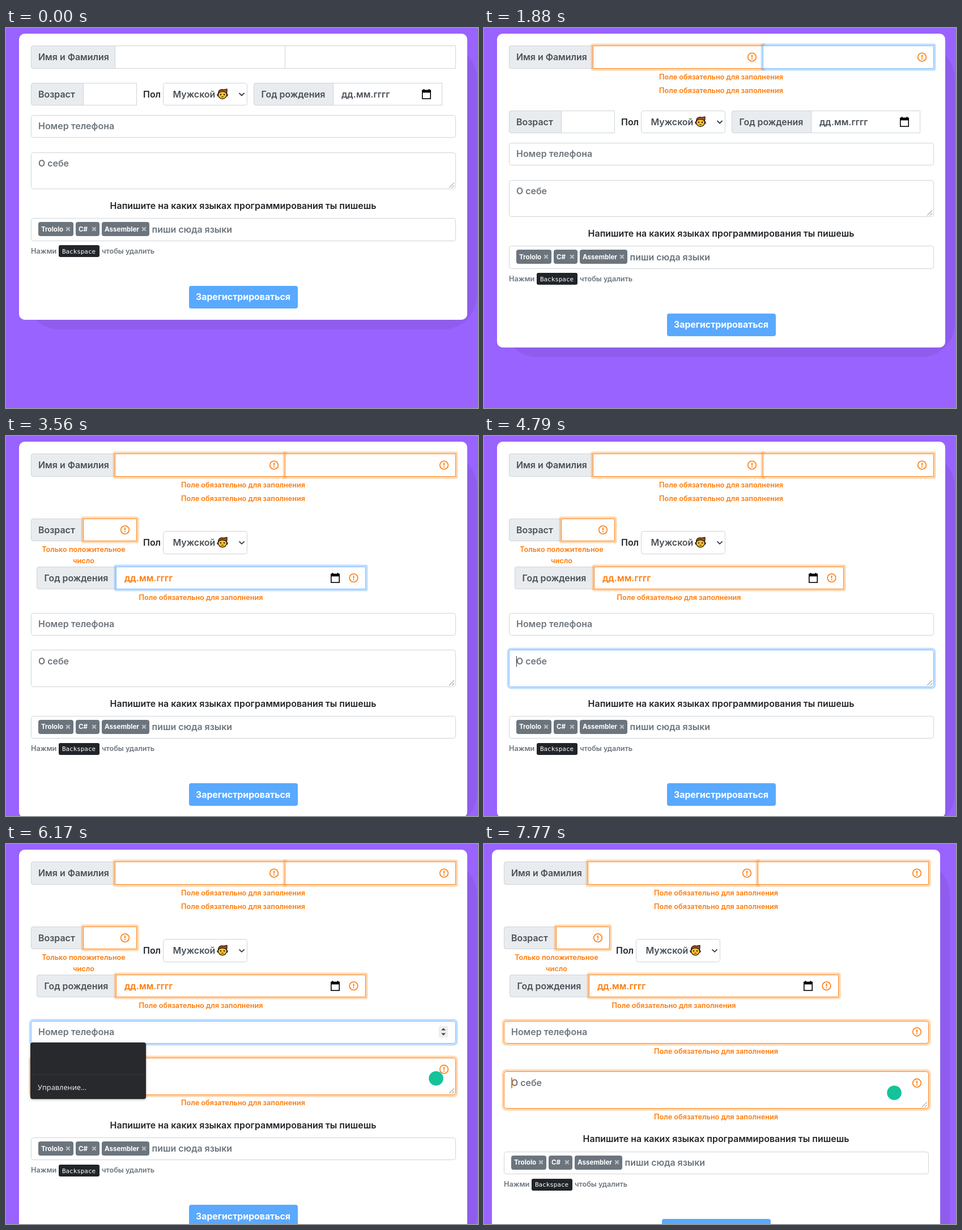
Animation of 833 by 672 pixels, one loop 8000 ms. Source, as an HTML page with a canvas:

```html
<!DOCTYPE html>
<html lang="ru">
<head>
<meta charset="utf-8">
<title>Форма регистрации</title>
<style>
  html, body { margin: 0; width: 100%; height: 100%; overflow: hidden; background: #9963ff; }
  canvas { display: block; width: 833px; height: 672px; }
</style>
</head>
<body>
<canvas id="stage" width="833" height="672"></canvas>
<script>
const ctx = document.getElementById('stage').getContext('2d');
const LOOP = 8000;
const SANS = 'Inter, "Open Sans", sans-serif';
const MONO = '"DejaVu Sans Mono", monospace';
const ORANGE = '#ff7a08', GRAY = '#6c757d', LABEL = '#495057', INK = '#212529';
const REQUIRED = 'Поле обязательно для заполнения';
const ROW = 40.25, ERROR_ROW = 24.3;

// Moments when the form changes
const T = {
  first: 730, second: 1240, hideSecond: 1760, age: 1880, hideAge: 2300,
  ageCaret: 2670, ageBad: 2700, date: 3250, dateBad: 3560, about: 3570,
  phone: 5290, badge: 5500, hidePhone: 6300, phoneBad: 6530
};

// Border and glow of a field, as rgba
const IDLE = { border: [206, 212, 218, 1], glow: [255, 255, 255, 0] };
const FOCUS = { border: [128, 189, 255, 1], glow: [0, 123, 255, 0.25] };
const BAD = { border: [255, 134, 24, 1], glow: [255, 134, 24, 0.34] };

const clamp = v => Math.max(0, Math.min(1, v));
const ease = v => v * v * (3 - 2 * v);
const mix = (a, b, k) => a.map((v, i) => v + (b[i] - v) * k);
const rgba = c => `rgba(${c.slice(0, 3).map(Math.round).join()},${c[3]})`;
const within = (t, a, b) => t >= a && t < b;

function look(t, ...steps) {
  let now = IDLE;
  for (const [start, next] of steps) {
    if (t < start) break;
    const k = ease(clamp((t - start) / 150));
    now = { border: mix(now.border, next.border, k), glow: mix(now.glow, next.glow, k) };
  }
  return now;
}

// Moves all four edges to whole pixels
function snap(x, y, w, h) {
  const left = Math.round(x), top = Math.round(y);
  return [left, top, Math.round(x + w) - left, Math.round(y + h) - top];
}

function text(str, x, cy, { size = 15.95, color = GRAY, weight = 600, align = 'left', family = SANS } = {}) {
  ctx.font = `${weight} ${size}px ${family}`;
  ctx.fillStyle = color;
  ctx.textAlign = align;
  ctx.fillText(str, x, Math.round(cy + size * 0.36));
}

const error = (str, x, cy) => text(str, x, cy, { size: 12.65, color: ORANGE, align: 'center' });

function box(x, y, w, h, r, fill, border) {
  [x, y, w, h] = snap(x, y, w, h);
  ctx.beginPath();
  ctx.roundRect(x, y, w, h, r);
  ctx.fillStyle = fill;
  ctx.fill();
  if (!border) return;
  ctx.beginPath();
  ctx.roundRect(x + 0.5, y + 0.5, w - 1, h - 1, r);
  ctx.strokeStyle = border;
  ctx.lineWidth = 1;
  ctx.stroke();
}

function line(color, width, ...pts) {
  ctx.beginPath();
  pts.forEach(([x, y]) => ctx.lineTo(x, y));
  ctx.strokeStyle = color;
  ctx.lineWidth = width;
  ctx.stroke();
}

function disc(x, y, r, color) {
  ctx.beginPath();
  ctx.arc(x, y, r, 0, 7);
  ctx.fillStyle = color;
  ctx.fill();
}

function input(x, y, w, h, r, style = IDLE) {
  const g = 3.4;
  [x, y, w, h] = snap(x, y, w, h);
  box(x, y, w, h, r, '#fff', rgba(style.border));
  ctx.beginPath();
  ctx.roundRect(x - g, y - g, w + 2 * g, h + 2 * g, r + g);
  ctx.roundRect(x, y, w, h, r);
  ctx.fillStyle = rgba(style.glow);
  ctx.fill('evenodd');
}

function addon(str, x, y, w, tx) {
  box(x, y, w, ROW, [4, 0, 0, 4], '#e9ecef', '#ced4da');
  text(str, tx, y + 20, { color: LABEL });
}

function warning(x, y) {
  ctx.beginPath();
  ctx.arc(x, y, 7.3, 0, 7);
  ctx.strokeStyle = ORANGE;
  ctx.lineWidth = 1.6;
  ctx.stroke();
  line(ORANGE, 1.8, [x, y - 4.2], [x, y + 1]);
  disc(x, y + 3.3, 1.1, ORANGE);
}

function spinner(x, y) {
  box(x - 8, y - 10, 16, 20, 2, '#ededed');
  ctx.fillStyle = '#444';
  for (const s of [-1, 1]) {
    ctx.beginPath();
    ctx.moveTo(x - 4, y + s * 2.5);
    ctx.lineTo(x + 4, y + s * 2.5);
    ctx.lineTo(x, y + s * 6.5);
    ctx.fill();
  }
}

function calendar(x, y) {
  ctx.strokeStyle = '#000';
  ctx.lineWidth = 1.6;
  ctx.strokeRect(x - 7.2, y - 6.5, 14.4, 14.5);
  ctx.fillStyle = '#000';
  ctx.fillRect(x - 8, y - 7.3, 16, 4.6);
  ctx.fillRect(x - 5.5, y - 9, 2, 2);
  ctx.fillRect(x + 3.5, y - 9, 2, 2);
}

function boy(x, y) {
  ctx.lineWidth = 1.2;
  ctx.strokeStyle = '#1c1207';
  for (const s of [-1, 1]) {
    disc(x + s * 7.4, y + 1.5, 1.8, '#ffc02e');
    ctx.stroke();
  }
  disc(x, y + 0.8, 7.6, '#ffc02e');
  ctx.stroke();
  ctx.beginPath();
  ctx.moveTo(x - 7.4, y - 1);
  ctx.bezierCurveTo(x - 7.5, y - 8, x - 2, y - 9, x + 2, y - 8);
  ctx.lineTo(x + 8, y - 9);
  ctx.quadraticCurveTo(x + 8.5, y - 5, x + 7.4, y - 1);
  ctx.quadraticCurveTo(x + 5, y - 4.5, x, y - 4.5);
  ctx.quadraticCurveTo(x - 5, y - 4.5, x - 7.4, y - 1);
  ctx.fillStyle = '#a4502a';
  ctx.fill();
  ctx.stroke();
  disc(x - 3, y + 0.8, 1.2, '#1c1207');
  disc(x + 3, y + 0.8, 1.2, '#1c1207');
  line('#1c1207', 1, [x - 2, y + 4.8], [x + 2, y + 4.8]);
}

function tag(str, x, y, w) {
  box(x, y, w, 25, 4, GRAY);
  text(str, x + 5, y + 12.3, { size: 11.6, color: '#fff', weight: 700 });
  const cx = x + w - 9.5, cy = y + 12.3, c = '#b9bec3';
  line(c, 2.2, [cx - 3.2, cy - 3.2], [cx + 3.2, cy + 3.2]);
  line(c, 2.2, [cx - 3.2, cy + 3.2], [cx + 3.2, cy - 3.2]);
}

function popup(t, x, y, w, h, start, hide) {
  if (!within(t, start, hide + 120)) return;
  ctx.save();
  ctx.globalAlpha = 1 - clamp((t - hide) / 120);
  ctx.shadowColor = 'rgba(0,0,0,.3)';
  ctx.shadowBlur = 4;
  ctx.shadowOffsetY = 1;
  box(x, y, w, h, 4, '#27292c');
  ctx.shadowColor = 'transparent';
  ctx.fillStyle = '#35373b';
  ctx.fillRect(x, y + h - 44, w, 1);
  text('Управление...', x + 13, y + h - 21,
    { size: 12.7, color: '#e8eaed', weight: 400, family: '"Noto Sans", "Open Sans", sans-serif' });
  ctx.restore();
}

function caret(x, y, color = '#333', w = 1) {
  ctx.fillStyle = color;
  ctx.fillRect(x, Math.round(y), w, 19);
}

function card(bottom) {
  box(34, 30, 797, bottom + 17 - 30, 60, '#8f5ded');
  box(23, 10, 791, bottom - 10, 10, '#fff');
}

function names(t) {
  const first = () => input(192, 31.3, 301, ROW, 0, look(t, [T.first, FOCUS], [T.second, BAD]));
  const second = () => input(492, 31.3, 302, ROW, 0, look(t, [T.second, FOCUS], [T.age, BAD]));
  addon('Имя и Фамилия', 44, 31.3, 149, 57);
  // The focused field lies on top
  const order = within(t, T.first, T.second) ? [second, first] : [first, second];
  order.forEach(paint => paint());
  if (t < T.second) return;
  warning(473, 51.5);
  warning(773, 51.5);
  error(REQUIRED, 418.5, 86);
  error(REQUIRED, 418.5, 110);
}

function ageRow(t, y) {
  const bad = t >= T.ageBad;
  addon('Возраст', 44, y, 93, 57);
  input(136, y, 95, ROW, 0, look(t, [T.age, FOCUS], [T.ageBad, BAD]));
  if (within(t, T.age + 40, T.ageBad)) spinner(209, y + 20);
  if (within(t, T.age + 40, T.hideAge) || within(t, T.ageCaret, T.ageBad)) caret(176, y + 10);
  if (bad) {
    warning(210, y + 20);
    error('Только положительное', 137, y + 54);
    error('число', 137, y + 74);
  }

  const mid = y + (bad ? 22.3 : 0);
  text('Пол', 242, mid + 20, { color: INK });
  input(277, mid, 149, ROW, 4);
  text('Мужской', 294.5, mid + 20, { color: LABEL });
  boy(382, mid + 20);
  line('#343a40', 1.8, [411.5, mid + 18], [416, mid + 22.5], [420.5, mid + 18]);

  const wrapped = t >= T.dateBad;
  const d = wrapped ? { x: 54, y: y + 85, w: 441 } : { x: 437, y: mid, w: 193 };
  const left = d.x + 140, right = left + d.w;
  addon('Год рождения', d.x, d.y, 141, d.x + 13.5);
  input(left, d.y, d.w, ROW, 0, look(t, [T.date, FOCUS], [T.dateBad, BAD]));
  text('дд.мм.гггг', left + 15, d.y + 20, { color: wrapped ? ORANGE : LABEL });
  calendar(right - (wrapped ? 54 : 28), d.y + 20);
  if (wrapped) {
    warning(613.5, d.y + 20);
    error(REQUIRED, 344, d.y + 54);
  }
}

function phone(t, y) {
  input(44, y, 750, ROW, 4, look(t, [T.phone, FOCUS], [T.phoneBad, BAD]));
  text('Номер телефона', 57, y + 19.5);
  if (within(t, 4100, 4790) || within(t, 5110, T.phoneBad)) spinner(772, y + 19.5);
  if (within(t, T.phone, 5800)) caret(57, y + 10);
  if (t >= T.phoneBad) {
    warning(773, y + 19.7);
    error(REQUIRED, 418.5, y + 53.7);
  }
}

function about(t, y) {
  input(44, y, 750, 65.7, 4, look(t, [T.about, FOCUS], [T.phone, BAD]));
  text('О себе', 57, y + 20);
  line('#777', 1, [782, y + 63], [791, y + 54]);
  line('#777', 1, [787, y + 63], [791, y + 59]);
  if (within(t, 3710, 4930)) caret(57, y + 11);
  if (within(t, 6700, 7230) || t >= 7770) caret(57, y + 11, ORANGE, 2);
  if (t >= T.phone) {
    warning(773, y + 20.3);
    error(REQUIRED, 418.5, y + 79.7);
  }
}

// y is the shift of everything below the text area
function languages(y) {
  text('Напишите на каких языках программирования ты пишешь', 418.5, y + 314.3, { color: INK, align: 'center' });
  input(44, y + 336.3, 750, ROW, 4);
  tag('Trololo', 57, y + 343.3, 62);
  tag('C#', 123, y + 343.3, 42);
  tag('Assembler', 169, y + 343.3, 84);
  text('пиши сюда языки', 257.5, y + 355.8);
  text('Нажми', 44, y + 394, { size: 12.65 });
  box(93, y + 384.3, 72, 21, 3, INK);
  text('Backspace', 99, y + 394.8, { size: 10.9, color: '#fff', weight: 400, family: MONO });
  text('чтобы удалить', 169, y + 394, { size: 12.65 });
  box(323, y + 455.5, 192, ROW, 4, '#59a9ff');
  text('Зарегистрироваться', 418.5, y + 475.3, { color: '#fff', weight: 700, align: 'center', size: 15.8 });
}

function draw(t) {
  const row = t >= T.second ? 49 : 0;
  const phoneShift = row + (t >= T.ageBad ? 45 : 0) + (t >= T.dateBad ? 64.6 : 0);
  const aboutShift = phoneShift + (t >= T.phoneBad ? ERROR_ROW : 0);
  const endShift = aboutShift + (t >= T.phone ? ERROR_ROW : 0);

  ctx.setTransform(1, 0, 0, 1, 0, 0);
  ctx.fillStyle = '#9963ff';
  ctx.fillRect(0, 0, 833, 672);
  ctx.translate(t >= T.phoneBad ? -9 : 0, 0);

  card(516 + endShift);
  names(t);
  ageRow(t, 97 + row);
  phone(t, 154 + phoneShift);
  about(t, 219.5 + aboutShift);
  languages(endShift);

  if (t >= T.phoneBad) disc(733, 440, 12.8, '#15c39a');
  else if (t >= T.badge) disc(759, 414.5, 12.8, '#15c39a');

  popup(t, 191, 71, 204, 126, T.first, T.second);
  popup(t, 491, 71, 204, 126, T.second, T.hideSecond);
  popup(t, 135, 185, 210, 97, T.age + 30, T.hideAge);
  popup(t, 43, 351, 204, 100, T.phone, T.hidePhone);
}

function tick() {
  draw(performance.now() % LOOP);
  requestAnimationFrame(tick);
}
tick();
</script>
</body>
</html>
```
